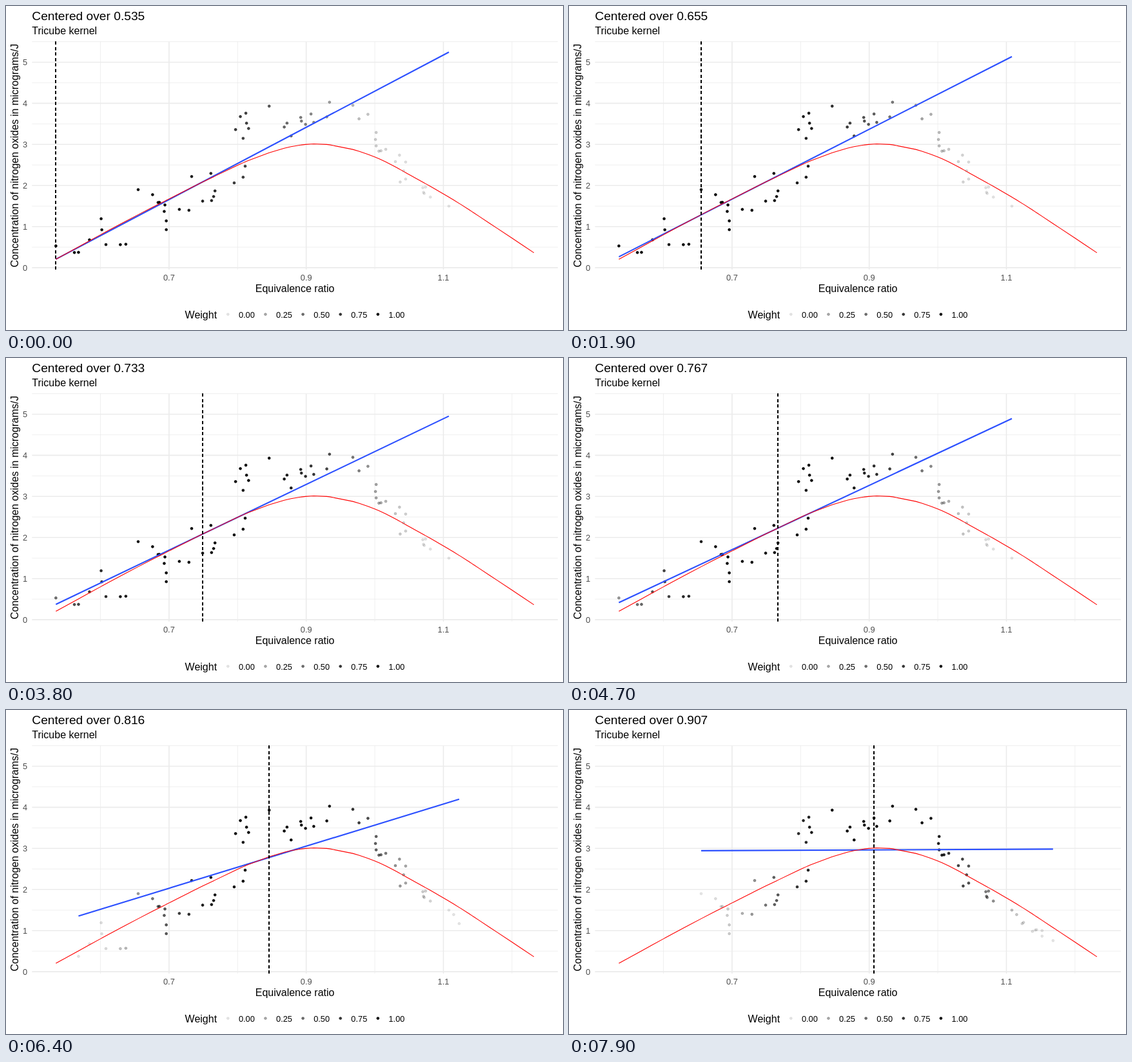
These frames come from a looping animation (864 by 504 pixels, 8 s). An HTML page:

```html
<!DOCTYPE html>
<html lang="en">
<head>
<meta charset="utf-8">
<title>Local regression</title>
<style>
  html, body { margin: 0; width: 100%; height: 100%; overflow: hidden; background: #fff; }
  svg { display: block; width: 864px; height: 504px; font-family: "Liberation Sans", Arial, sans-serif; }
</style>
</head>
<body>
<svg id="chart" viewBox="0 0 864 504"></svg>
<script>
const chart = document.getElementById("chart");
const panel = { left: 40.3, right: 856, top: 55.4, bottom: 410.1 };
const STEP = 100, FRAMES = 80, NEIGHBOURS = 66;

// Equivalence ratio and matching nitrogen oxide concentration, sorted by ratio
const ratio = [
  .535, .562, .568, .584, .601, .602, .608, .629, .637, .655, .676, .684, .686, .693, .694,
  .696, .696, .715, .729, .733, .749, .761, .762, .765, .767, .795, .797, .804, .808, .808,
  .811, .812, .813, .816, .846, .868, .872, .878, .892, .893, .899, .907, .911, .930, .934,
  .968, .977, .990, 1.001, 1.002, 1.002, 1.006, 1.009, 1.016, 1.030, 1.036, 1.037, 1.042, 1.045, 1.045,
  1.070, 1.071, 1.072, 1.074, 1.081, 1.108, 1.115, 1.123, 1.125, 1.138, 1.142, 1.144, 1.152, 1.152, 1.168];
const oxides = [
  .530, .370, .374, .678, 1.192, .923, .563, .561, .571, 1.900, 1.777, 1.587, 1.590, 1.369, 1.527,
  .926, 1.139, 1.419, 1.397, 2.219, 1.620, 2.295, 1.634, 1.732, 1.869, 2.064, 3.361, 3.677, 3.148, 2.202,
  2.471, 3.760, 3.517, 3.388, 3.931, 3.423, 3.519, 3.206, 3.656, 3.567, 3.488, 3.741, 3.536, 3.669, 4.028,
  3.952, 3.623, 3.732, 3.120, 2.964, 3.290, 2.836, 2.845, 2.881, 2.581, 2.739, 2.085, 2.358, 2.157, 2.571,
  1.947, 1.836, 1.806, 1.962, 1.719, 1.498, 1.390, 1.170, 1.200, .981, 1.013, 1.021, 1.000, .866, .756];
const centers = [...new Set(ratio)].slice(0, FRAMES / 2);

const px = v => 252.9 + (v - .7) * 1063.9;
const py = v => 407.1 - v * 63.93;

function add(tag, attrs, parent = chart) {
  const node = document.createElementNS("http://www.w3.org/2000/svg", tag);
  for (const key in attrs) node.setAttribute(key, attrs[key]);
  parent.appendChild(node);
  return node;
}
function label(content, x, y, size, attrs = {}) {
  const node = add("text", { x, y, "font-size": size, ...attrs });
  node.textContent = content;
  return node;
}
function setWeight(dot, weight) {
  const alpha = .1 + .9 * weight;
  dot.setAttribute("fill-opacity", alpha);
  dot.setAttribute("stroke-opacity", alpha);
}
const addDot = (cx, cy) => add("circle", { cx, cy, r: 1.955, stroke: "#000", "stroke-width": .71 });

// Weighted straight line through the nearest points, with tricube weights
function localFit(center) {
  const distances = ratio.map(x => Math.abs(x - center));
  const reach = [...distances].sort((a, b) => a - b)[NEIGHBOURS - 1];
  const weights = distances.map(d => d <= reach + 1e-9 ? Math.max(0, 1 - (d / reach) ** 3) ** 3 : null);
  let sw = 0, sx = 0, sy = 0, sxx = 0, sxy = 0;
  weights.forEach((w, i) => {
    const x = ratio[i] - center, y = oxides[i];
    sw += w; sx += w * x; sy += w * y; sxx += w * x * x; sxy += w * x * y;
  });
  const slope = (sw * sxy - sx * sy) / (sw * sxx - sx * sx);
  const value = (sy - slope * sx) / sw;
  const inside = ratio.filter((x, i) => weights[i] !== null);
  return { weights, slope, value, from: inside[0], to: inside[inside.length - 1],
           at: x => value + slope * (x - center) };
}

// Smooth curve: cubic Hermite pieces between knots of [x, value, slope]
function smoothPath() {
  const knots = [.4653, .68, .7615, .8145].map(x => {
    const { value, slope } = localFit(x);
    return [x, value, slope];
  });
  knots.push([.932, 2.995, -2], [1.033, 2.426, -9.4], [1.1115, 1.683, -10.1],
             [1.1785, .958, -11], [1.232, .364, -11.2]);
  const valueAt = x => {
    const i = Math.max(1, knots.findIndex(k => k[0] >= x));
    const [x0, y0, m0] = knots[i - 1], [x1, y1, m1] = knots[i];
    const h = x1 - x0, t = (x - x0) / h, u = 1 - t;
    return u * u * (1 + 2 * t) * y0 + t * u * u * h * m0 + t * t * (3 - 2 * t) * y1 - t * t * u * h * m1;
  };
  const xs = [...new Set(ratio), 1.1785, 1.2, 1.215, 1.232];
  return "M" + xs.map(x => px(x).toFixed(2) + " " + py(valueAt(x)).toFixed(2)).join("L");
}

function grid(step, offset, width) {
  const style = { stroke: "#ebebeb", "stroke-width": width };
  for (let v = offset * step; v < 5.6; v += step)
    add("line", { x1: panel.left, x2: panel.right, y1: py(v), y2: py(v), ...style });
  for (let v = .7 - (offset ? .1 : 0); v < 1.25; v += .2)
    add("line", { x1: px(v), x2: px(v), y1: panel.top, y2: panel.bottom, ...style });
}
grid(1, .5, .78);
grid(1, 0, 1.55);

const dots = ratio.map((x, i) => addDot(px(x), py(oxides[i])));
const fitLine = add("line", { stroke: "#2b4fff", "stroke-width": 2.13 });
add("path", { d: smoothPath(), fill: "none", stroke: "#f00", "stroke-width": 1.07 });

// The marker is drawn once per neighbour, which hardens its edges
const marker = add("g", { stroke: "#000", "stroke-width": 1.07, "stroke-dasharray": "4.27 4.27" });
for (let i = 0; i < NEIGHBOURS; i++)
  add("line", { x1: 0, x2: 0, y1: panel.bottom, y2: panel.top }, marker);

const title = label("", 40.3, 22, 19.2);
label("Tricube kernel", 40.3, 44, 16);
for (let v = 0; v <= 5; v++)
  label(v, 33.2, py(v) + 5, 12.8, { "text-anchor": "end", fill: "#4d4d4d" });
for (const v of [.7, .9, 1.1])
  label(v, px(v), 427, 12.8, { "text-anchor": "middle", fill: "#4d4d4d" });
label("Equivalence ratio", 448.1, 445, 16, { "text-anchor": "middle" });
label("Concentration of nitrogen oxides in micrograms/J", 0, 0, 16,
  { "text-anchor": "middle", transform: "translate(19.3 232.7) rotate(-90)" });

label("Weight", 277.6, 486, 16);
for (let i = 0; i < 5; i++) {
  setWeight(addDot(344.3 + 58.15 * i, 479.6), i / 4);
  label((i / 4).toFixed(2), 360.9 + 58.15 * i, 485, 12.8);
}

const fits = centers.map(localFit);

function draw(frame) {
  const state = frame >> 1;
  const fit = fits[state];
  // The title follows one step behind the marker
  title.textContent = "Centered over " + centers[Math.max(0, (frame - 1) >> 1)];
  marker.setAttribute("transform", `translate(${px(centers[state])} 0)`);
  dots.forEach((dot, i) => {
    const weight = fit.weights[i];
    dot.setAttribute("display", weight === null ? "none" : "inline");
    setWeight(dot, weight || 0);
  });
  fitLine.setAttribute("x1", px(fit.from));
  fitLine.setAttribute("y1", py(fit.at(fit.from)));
  fitLine.setAttribute("x2", px(fit.to));
  fitLine.setAttribute("y2", py(fit.at(fit.to)));
}

const start = performance.now();
let shown = -1;
function tick() {
  const frame = Math.floor((performance.now() - start) / STEP) % FRAMES;
  if (frame !== shown) draw(shown = frame);
  requestAnimationFrame(tick);
}
tick();
</script>
</body>
</html>
```
